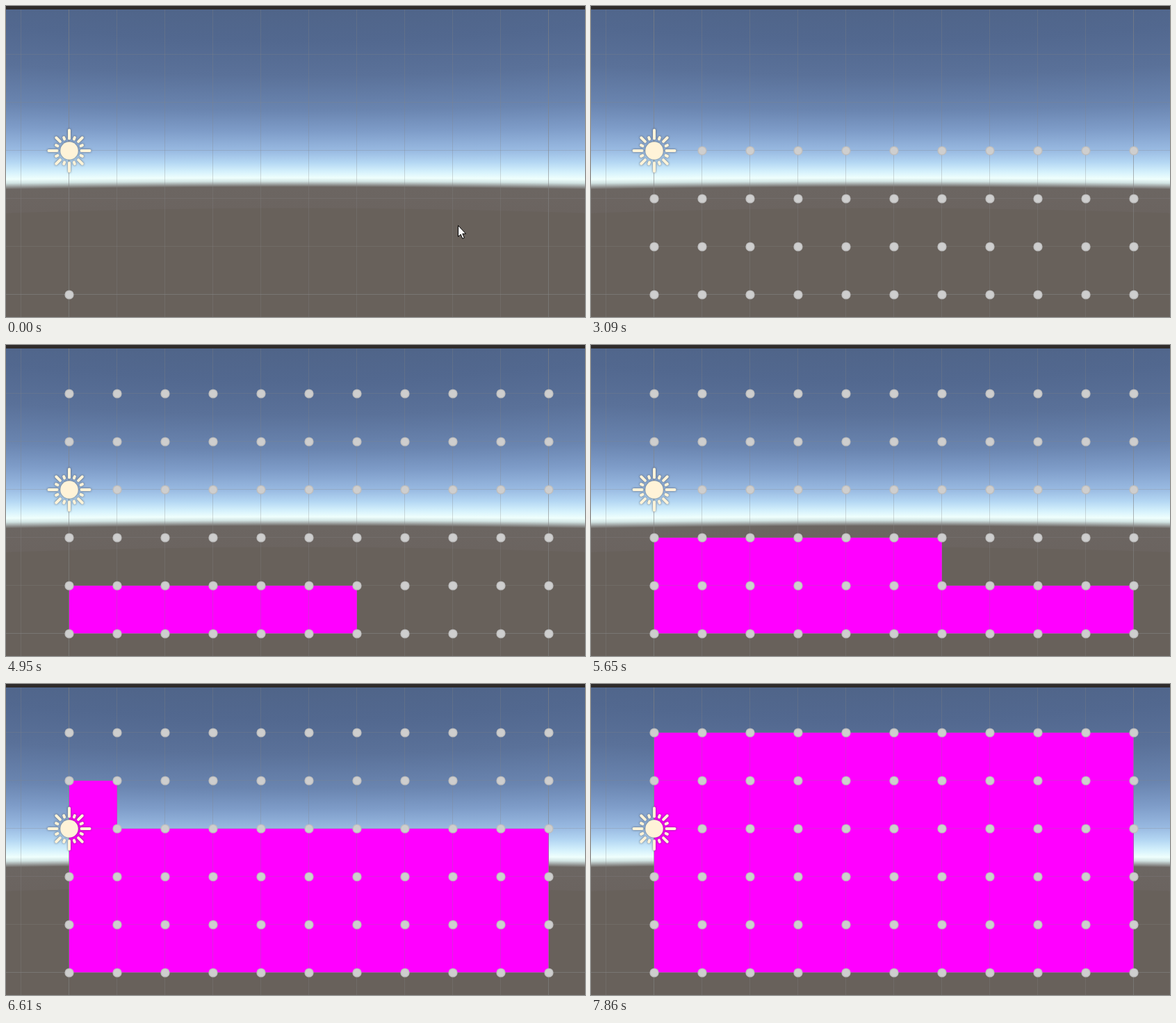
An HTML page with a canvas that plays this animation: 833x447 px, repeating every 8680 ms.

```html
<!DOCTYPE html>
<html lang="en">
<head>
<meta charset="utf-8">
<title>Grid mesh</title>
<style>
  html, body { margin: 0; width: 100%; height: 100%; overflow: hidden; background: #2f2c2b; }
  canvas { display: block; }
</style>
</head>
<body>
<canvas id="stage" width="833" height="447"></canvas>
<script>
const W = 833, H = 447, LOOP = 8680;
const CELL = 69, LEFT = 91, BOTTOM = 415, COLS = 10, ROWS = 5;
const DOTS = (COLS + 1) * (ROWS + 1), QUADS = COLS * ROWS;
const ctx = document.getElementById('stage').getContext('2d');

// [time in ms, tick]: the pace drifts slightly between these points
const PACE = [[130, 0], [930, 12], [1830, 25], [2330, 32], [3300, 46],
              [4190, 59], [4250, 60], [5090, 72], [7860, 112]];
const tickTimes = [];
for (let i = 1; i < PACE.length; i++) {
  const [t0, k0] = PACE[i - 1], [t1, k1] = PACE[i];
  for (let k = k0; k <= k1; k++) {
    tickTimes[k] = Math.round((t0 + (t1 - t0) * (k - k0) / (k1 - k0)) / 10) * 10;
  }
}

const SKY = [[0, '#4f6488'], [50, '#52688f'], [100, '#5a7199'], [150, '#6a85b0'],
             [180, '#7e9cc8'], [208, '#98b9e1'], [225, '#b4d7f3'], [238, '#d5f1fc'],
             [247, '#effffd'], [252, '#d2e4e3'], [256, '#a0a5a4'], [260, '#6c6662'],
             [290, '#6b6460'], [291, '#68615b'], [H, '#68615b']];

function layer(draw) {
  const c = document.createElement('canvas');
  c.width = W;
  c.height = H;
  draw(c.getContext('2d'));
  return c;
}

const backdrop = layer(g => {
  const fill = g.createLinearGradient(0, 0, 0, H);
  SKY.forEach(([y, color]) => fill.addColorStop(y / H, color));
  g.fillStyle = fill;
  const eye = 230;
  for (let x = 0; x < W; x++) {
    const u = (x - W / 2) / (W / 2);
    const s = Math.sqrt(1 + 0.25 * u * u);
    g.setTransform(1, 0, 0, s, 0, eye - eye * s);
    g.fillRect(x, -60, 1, H + 120);
  }
});

const gridLines = layer(g => {
  for (let i = -1; i <= COLS; i++) {
    g.fillStyle = `rgba(132,132,132,${i === 0 || i === COLS ? 0.6 : 0.3})`;
    g.fillRect(LEFT - 1 + i * CELL, 0, 1, H);
  }
  for (let j = 0; j <= ROWS; j++) {
    g.fillStyle = `rgba(132,132,132,${j === 0 ? 0.6 : 0.28})`;
    g.fillRect(0, BOTTOM - 1 - j * CELL, W, 1);
  }
  g.fillStyle = '#2f2c2b';
  g.fillRect(0, 0, W, 5);
});

const sun = layer(g => {
  g.translate(91, 208);
  g.lineCap = 'round';
  g.strokeStyle = g.fillStyle = '#fff3d8';
  g.shadowColor = 'rgba(50,50,50,.7)';
  g.shadowBlur = 3;
  g.lineWidth = 4;
  g.beginPath();
  for (let i = 0; i < 16; i++) {
    const a = i * Math.PI / 8;
    const [from, to] = i % 4 === 0 ? [17.5, 29.5] : i % 2 === 0 ? [18.5, 26.5] : [18, 20.5];
    g.moveTo(from * Math.cos(a), from * Math.sin(a));
    g.lineTo(to * Math.cos(a), to * Math.sin(a));
  }
  g.stroke();
  g.beginPath();
  g.arc(0, 0, 12.8, 0, 2 * Math.PI);
  g.fill();
});

const arrow = new Path2D('M650.5 315.5V331.5L654.2 328.2L656.8 334.3L659.4 333.2L656.8 327.3H661.5Z');

function drawDot(x, y) {
  ctx.beginPath();
  ctx.arc(x, y, 6.6, 0, 2 * Math.PI);
  ctx.fillStyle = '#bebebe';
  ctx.fill();
  ctx.beginPath();
  ctx.arc(x, y, 5.2, 0, 2 * Math.PI);
  ctx.fillStyle = '#cecece';
  ctx.fill();
}

function drawCursor() {
  ctx.fillStyle = '#fff';
  ctx.strokeStyle = '#000';
  ctx.lineWidth = 1;
  ctx.fill(arrow);
  ctx.stroke(arrow);
}

function render(t) {
  let tick = -1;
  while (tick + 1 < tickTimes.length && tickTimes[tick + 1] <= t) tick++;

  const dots = Math.min(DOTS, Math.max(1, tick + 1));
  // two late ticks add a pair of quads
  const quads = Math.min(QUADS, tick - 64 + (tick >= 87) + (tick >= 105));

  ctx.drawImage(backdrop, 0, 0);
  ctx.fillStyle = '#f0f';
  for (let i = 0; i < quads; i++) {
    const row = Math.floor(i / COLS);
    ctx.fillRect(LEFT + (i % COLS) * CELL, BOTTOM - (row + 1) * CELL, CELL, CELL);
  }
  ctx.drawImage(gridLines, 0, 0);
  for (let i = 0; i < dots; i++) {
    const row = Math.floor(i / (COLS + 1));
    drawDot(LEFT + (i % (COLS + 1)) * CELL, BOTTOM - row * CELL);
  }
  ctx.drawImage(sun, 0, 0);
  if (tick < 0) drawCursor();
}

const start = performance.now();
function loop() {
  render((performance.now() - start) % LOOP);
  requestAnimationFrame(loop);
}
loop();
</script>
</body>
</html>
```
